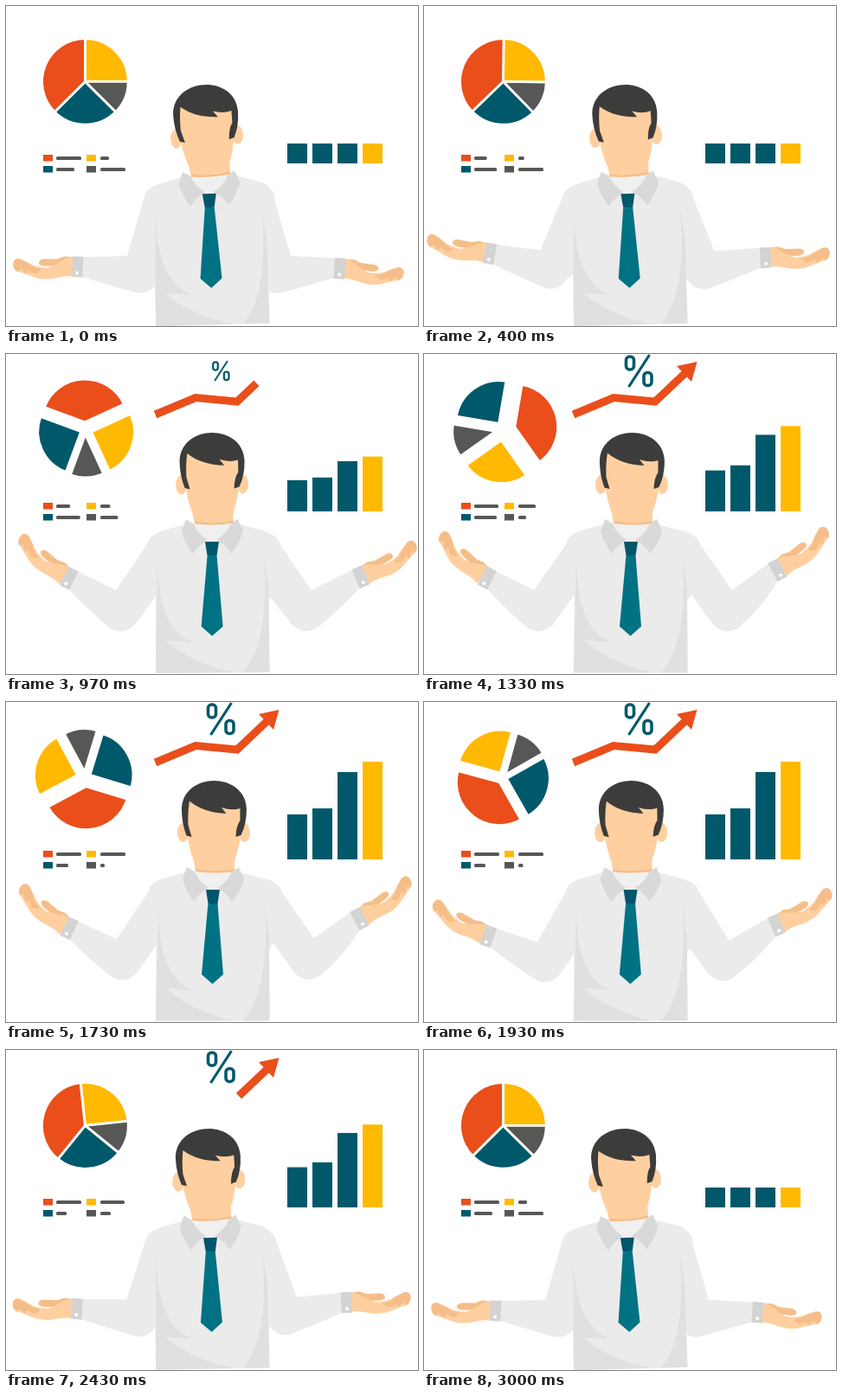
Recreate the animation shown at these times as an HTML page. Size 476 px wide and 370 px high, loop 3.03 s.

```html
<!DOCTYPE html>
<html lang="en">
<head>
<meta charset="utf-8">
<title>Presenter with charts</title>
<style>
html, body { margin: 0; width: 100%; height: 100%; overflow: hidden; background: #fff; }
svg { display: block; width: 100vw; height: 100vh; }
</style>
</head>
<body>
<svg viewBox="0 0 476 370">
  <defs>
    <g id="hand">
      <path fill="#f5be89" d="M76 291 L66 290 L58 293 L41 293 Q35 295 37 299 Q40 302 50 301 L66 302 Z"/>
      <path fill="#ffcf9f" d="M77 291 L68 292 Q57 300 47 303 Q34 303 26 298 L15 293 Q8 292 7 298 Q6 307 17 309 L31 314 Q42 318 56 315 Q67 312 77 313 Z"/>
      <path fill="#f5be89" d="M14 293 Q8 292 7 298 Q7 306 13 308 L15 304 L22 310 L24 306 L33 310 L40 305 Q29 303 23 297 Z"/>
    </g>
    <mask id="reveal" maskUnits="userSpaceOnUse" x="160" y="0" width="170" height="90">
      <path id="wipe" fill="none" stroke="#fff" stroke-width="32" d="M172 70 L219 50 L267 55 L317 8"/>
    </mask>
  </defs>

  <g id="pie"></g>
  <g id="legend"></g>
  <g id="bars"></g>

  <g mask="url(#reveal)" fill="#ea4e1b">
    <path fill="none" stroke="#ea4e1b" stroke-width="9" d="M172.500 70 L219 50.500 L267 55 L305 19"/>
    <path d="M315.500 9 L309 32 L292 14 Z"/>
  </g>
  <g id="percent" fill="none" stroke="#00596a" stroke-width="3.600">
    <rect x="233.500" y="3" width="9" height="15" rx="4"/>
    <rect x="254" y="21.500" width="9" height="15" rx="4"/>
    <path stroke-width="3.200" d="M260.500 1 L236.500 38"/>
  </g>

  <g id="leftArm"></g>
  <g id="rightArm"></g>

  <g id="torso">
    <path fill="#ebebeb" d="M207 197 L182 204 Q166 209 165 218 L174 240 L173 368.500 H304.500 L304 272 L315 222 Q310 208 296 204 L271 197 Z"/>
    <path fill="#e0e0e0" d="M176 234 C176 285 186 321 215 333 L185 331 C204 348 232 362 264 368.500 H173 Z"/>
    <path fill="#e0e0e0" d="M299 234 C303 300 295 345 274 368.500 H304.500 L304 272 Z"/>
    <path fill="#f0f0f0" d="M216 196 H263 L248 218 H230 Z"/>
    <g id="head">
      <path fill="#ffcf9f" d="M210 110 H272 V146 Q270 168 264 183 V196 Q240 199 219 196 L217 184 Q210 166 209 146 Z"/>
      <path fill="#f5be89" d="M219 193 Q240 198 264 193 V196 Q240 199 219 196 Z"/>
      <ellipse cx="204.500" cy="151" rx="6.500" ry="11" fill="#ffcf9f"/>
      <ellipse cx="275.500" cy="151" rx="6.500" ry="11" fill="#ffcf9f"/>
      <path fill="#3c3c3b" d="M214.500 156 L208.500 154.500 Q203 140 203 124 C204 80 277 80 278 124 Q278 141 271.500 154 L265.500 156 Q266 143 270.500 137 V123 Q261 126 249 122 L254.500 129 Q228 128 212 114.500 Q210 126 210.500 142 Z"/>
    </g>
    <path fill="#d9d9d9" d="M209 191 L204 205 Q208 219 217 231 Q223 221 234 215 Q222 207 218 196 Z"/>
    <path fill="#d9d9d9" d="M269 191 L275 205 Q271 219 261 231 Q256 221 244 215 Q257 207 261 196 Z"/>
    <path fill="#00566a" d="M231 217 H247 L244.500 233 H233.500 Z"/>
    <path fill="#007283" d="M233.500 233 H244.500 L251 315 L238.500 326 L226 315 Z"/>
  </g>
</svg>
<script>
const LOOP = 3030;
const TEAL = '#00596a', ORANGE = '#ea4e1b', YELLOW = '#ffb900', GRAY = '#575756';
const el = id => document.getElementById(id);
const clamp = x => Math.min(1, Math.max(0, x));
const lerp = (a, b, k) => a + (b - a) * k;
const mix = (p, q, k) => p.map((v, i) => lerp(v, q[i], k));
const part = (t, from, to) => clamp((t - from) / (to - from));
const sine = x => (1 - Math.cos(Math.PI * x)) / 2;
const ease = (t, from, to) => sine(part(t, from, to));
const pulse = (t, a, b, c, d) => ease(t, a, b) - ease(t, c, d);
const polar = (deg, r) => [Math.sin(deg * Math.PI / 180) * r, -Math.cos(deg * Math.PI / 180) * r];

function add(parent, tag, attrs) {
  const node = document.createElementNS('http://www.w3.org/2000/svg', tag);
  set(node, attrs);
  parent.appendChild(node);
  return node;
}
function set(node, attrs) {
  for (const name in attrs) node.setAttribute(name, attrs[name]);
}

// Pie: start angle, end angle, colour, how far it flies out
const slices = [[0, 90, YELLOW, 12.5], [90, 135, GRAY, 9], [135, 225, TEAL, 8.5], [225, 360, ORANGE, 13.8]]
  .map(([from, to, fill, reach]) => {
    const a = polar(from, 49.8), b = polar(to, 49.8);
    const node = add(el('pie'), 'path', {
      fill, stroke: '#fff', 'stroke-width': 2.8, d: `M0 0 L${a} A49.8 49.8 0 0 1 ${b} Z`
    });
    return { node, reach, middle: (from + to) / 2 };
  });

function drawPie(t) {
  const spin = 360 * ease(t, 330, 2620);
  const spread = pulse(t, 450, 1350, 1350, 2500);
  for (const s of slices) {
    const [x, y] = polar(s.middle + spin, s.reach * spread);
    set(s.node, { transform: `translate(${91.4 + x} ${87.4 + y}) rotate(${spin})` });
  }
}

// Legend: line lengths at the key times
const legendTimes = [0, 670, 1330, 1730, 2130, 2430, 3000];
const legend = [
  [43, 176, ORANGE, [29, 7, 28, 29, 29, 29, 29]],
  [93, 176, YELLOW, [10, 5, 20, 29, 29, 28, 10]],
  [43, 189, TEAL, [21, 29, 26, 14, 12, 12, 21]],
  [93, 189, GRAY, [29, 29, 9, 5, 6, 12, 29]]
].map(([x, y, fill, lengths]) => {
  add(el('legend'), 'rect', { x, y: y - 4, width: 11, height: 7.5, fill });
  const left = x < 60 ? 58 : 109;
  const node = add(el('legend'), 'rect', { x: left, y: y - 2, height: 4, rx: 1.5, fill: GRAY });
  return { node, lengths };
});

function drawLegend(t) {
  let i = 0;
  while (i < legendTimes.length - 2 && t > legendTimes[i + 1]) i++;
  const k = ease(t, legendTimes[i], legendTimes[i + 1]);
  for (const { node, lengths } of legend) set(node, { width: lerp(lengths[i], lengths[i + 1], k) });
}

const bars = [29, 36, 78, 90].map((gain, i) => ({
  gain,
  node: add(el('bars'), 'rect', { x: 325 + 29 * i, width: 23, fill: i < 3 ? TEAL : YELLOW })
}));

function drawBars(t) {
  const rise = 1 - (1 - part(t, 700, 1750)) ** 2;
  const grow = rise - part(t, 2020, 2960) ** 2;
  for (const { node, gain } of bars) {
    const height = 23 + gain * grow;
    set(node, { y: 182 - height, height });
  }
}

function drawArrow(t) {
  const total = el('wipe').getTotalLength();
  const head = total * part(t, 664, 1060), tail = total * part(t, 2170, 2600);
  set(el('wipe'), { 'stroke-dasharray': `0 ${tail} ${Math.max(0, head - tail)} 400` });
  const size = pulse(t, 850, 1060, 2460, 2660);
  set(el('percent'), {
    transform: `translate(248.5 19.5) scale(${size}) translate(-248.5 -19.5)`,
    visibility: size > 0.01 ? 'visible' : 'hidden'
  });
}

// Arms: both are built as a left arm, the right one is mirrored
function makeArm(id) {
  const group = el(id);
  const hand = add(group, 'use', { href: '#hand' });
  const sleeve = add(group, 'path', { fill: '#ebebeb' });
  const cuff = add(group, 'g', {});
  add(cuff, 'rect', { x: -12, y: -12, width: 12.5, height: 24, fill: '#d3d3d3' });
  add(cuff, 'circle', { cx: -6, cy: 7, r: 2, fill: '#fff' });
  return { group, hand, sleeve, cuff };
}
const leftArm = makeArm('leftArm'), rightArm = makeArm('rightArm');

function drawArm(arm, pose) {
  const { lift, bend, shoulder } = pose;
  const elbow = mix([157, 309], [136, 297], lift);
  const at = (from, to, k) => mix(from, to, k).map((v, i) => v + elbow[i]);
  const corner = mix([140, 289], [127, 273], lift);
  const reach = polar(270 + pose.fore, pose.length);
  const wrist = [elbow[0] + reach[0], elbow[1] + reach[1]];
  const across = polar(pose.cuff, 11.5);
  const top = wrist.map((v, i) => v + across[i]);
  const bottom = wrist.map((v, i) => v - across[i]);
  const under = at([-5, 23], [-16, 20], bend);
  const tip = at([9, 24], [-1, 29], bend);
  const inner = at([16, 13], [13, 16], bend);
  const armpit = mix([174, 322], [174, 278], bend);
  const bow = mix([120, 323], [93, 294], bend);
  set(arm.sleeve, {
    d: `M190 203 Q${shoulder + 2} 207 ${shoulder - 1} 220 L${corner} L${top} L${bottom}` +
       `Q${bow} ${under} Q${tip} ${inner} L${armpit} L190 300 Z`
  });
  set(arm.cuff, { transform: `translate(${wrist}) rotate(${pose.cuff})` });
  const grip = polar(270 + pose.cuff, 11);
  set(arm.hand, {
    transform: `translate(${wrist[0] + grip[0]} ${wrist[1] + grip[1]}) rotate(${pose.hand}) translate(-76 -302)`
  });
}

function drawMan(t) {
  const lean = pulse(t, 100, 1400, 1680, 2850);
  set(el('torso'), { transform: `rotate(${-1.6 * (1 - lean)} 238 368)` });
  set(el('head'), { transform: `rotate(${-2.4 * (1 - lean)} 240 198)` });

  const left = rise => pulse(t, 0, rise, 1556, 2578);
  const right = rise => pulse(t, 0, rise, 1620, 2780);
  const shoulder = lerp(161, 165, lean);
  drawArm(leftArm, {
    shoulder, lift: left(900), bend: left(1050), length: lerp(69, 68, left(1050)),
    fore: lerp(6, 31.5, left(1050)), cuff: lerp(2, 27, left(1050)), hand: lerp(0, 43, left(1180))
  });
  drawArm(rightArm, {
    shoulder, lift: right(980), bend: right(1200), length: lerp(68, 72, right(1340)),
    fore: lerp(5, 38.5, right(1400)), cuff: lerp(-4, 28, right(1340)), hand: lerp(-7, 38, right(1360))
  });
  set(rightArm.group, { transform: `translate(${lerp(469, 483, lean)} 0) scale(-1 1)` });
}

function draw(t) {
  drawPie(t);
  drawLegend(t);
  drawBars(t);
  drawArrow(t);
  drawMan(t);
}

const start = performance.now();
function tick() {
  draw((performance.now() - start) % LOOP);
  requestAnimationFrame(tick);
}
tick();
</script>
</body>
</html>
```
